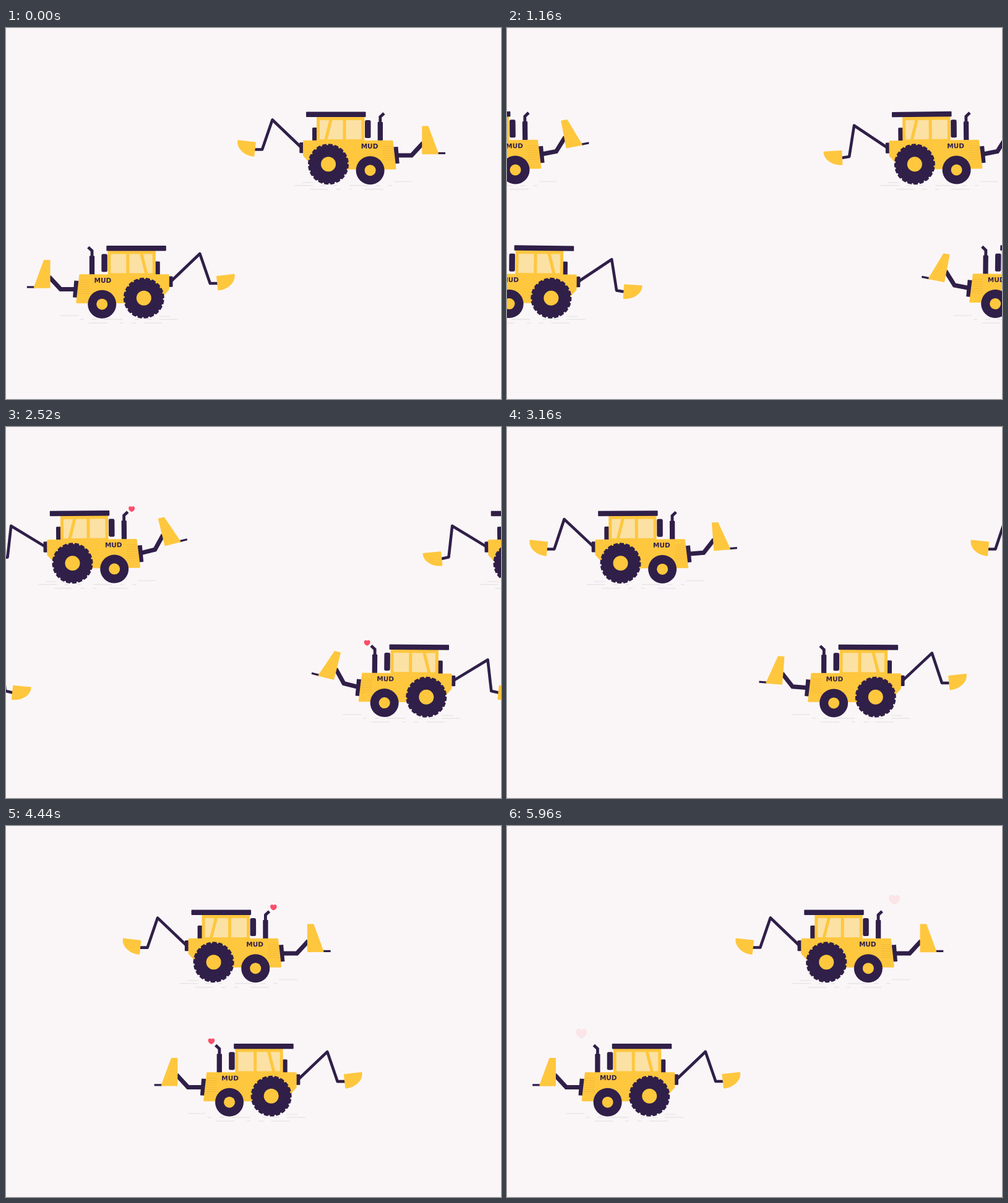
Animation, 800 px wide and 600 px high, one loop 6 s. Source, as an HTML page with a canvas:

```html
<!DOCTYPE html>
<html lang="en">
<head>
<meta charset="utf-8">
<title>Diggers in love</title>
<style>
html, body { margin: 0; width: 100%; height: 100%; overflow: hidden; background: #faf6f8; }
canvas { display: block; width: 800px; height: 600px; }
</style>
</head>
<body>
<canvas id="stage" width="800" height="600"></canvas>
<script>
const ctx = document.getElementById('stage').getContext('2d');
const LOOP = 6000, STEP = 40, RAD = Math.PI / 180;
const BG = '#faf6f8', YELLOW = '#ffc73e', DARK = '#301f48', GLASS = '#fbe1a4',
      GRILL = '#f1b73a', DUST = '#e8e5e8', PINK = '#fa4f68';

// Eased 0..1 ramp between two times
function ramp(t, a, b) {
  const x = Math.min(1, Math.max(0, (t - a) / (b - a)));
  return (1 - Math.cos(Math.PI * x)) / 2;
}

function line(color, width, ...points) {
  ctx.strokeStyle = color;
  ctx.lineWidth = width;
  ctx.beginPath();
  points.forEach(([x, y]) => ctx.lineTo(x, y));
  ctx.stroke();
}

// Fill and outline the current path, which rounds its corners
function soften(color, width) {
  ctx.closePath();
  ctx.fillStyle = ctx.strokeStyle = color;
  ctx.lineWidth = width;
  ctx.lineJoin = 'round';
  ctx.fill();
  ctx.stroke();
}

function poly(color, round, ...points) {
  ctx.beginPath();
  points.forEach(([x, y]) => ctx.lineTo(x, y));
  soften(color, round);
}

function box(color, x1, y1, x2, y2, r = 0) {
  ctx.fillStyle = color;
  ctx.beginPath();
  ctx.roundRect(x1, y1, x2 - x1, y2 - y1, r);
  ctx.fill();
}

function disc(color, x, y, r) {
  ctx.fillStyle = color;
  ctx.beginPath();
  ctx.arc(x, y, r, 0, 2 * Math.PI);
  ctx.fill();
}

// Draw inside a rotation about (x, y)
function turned(x, y, degrees, draw) {
  ctx.save();
  ctx.translate(x, y);
  ctx.rotate(degrees * RAD);
  ctx.translate(-x, -y);
  draw();
  ctx.restore();
}

function ground() {
  line(DUST, 1.5, [627, 248.5], [656, 248.5]);
  line(DUST, 1.5, [478, 250], [496, 250]);
  ctx.setLineDash([30, 12, 8, 13, 6, 20]);
  line(DUST, 1.5, [466, 254.7], [643, 254.7]);
  line(DUST, 1.5, [491, 260.7], [619, 260.7]);
  ctx.setLineDash([]);
}

function rearArm() {
  ctx.lineJoin = 'round';
  line(DARK, 4.6, [478, 194], [430.5, 148.5], [414, 196.5], [400, 196.5]);
  ctx.beginPath();
  ctx.moveTo(402.8, 185.5);
  ctx.ellipse(402.8, 185.5, 27.8, 21.6, 6.5 * RAD, Math.PI / 2, Math.PI);
  soften(YELLOW, 2);
}

function frontArm() {
  ctx.lineJoin = 'miter';
  line(DARK, 7, [628, 206], [655.5, 206], [674, 186]);
  line(DARK, 3.2, [697, 202.5], [710, 202.5]);
  poly(YELLOW, 2, [673.3, 159.5], [682, 159.5], [698, 203.2], [673.3, 203.2]);
}

function cab() {
  box(DARK, 495, 161, 503, 184, 1.5);
  box(DARK, 580, 149, 589.5, 178, 2.5);
  box(YELLOW, 502, 143, 579.3, 184);
  box(GLASS, 507, 149, 574.5, 180);
  line(YELLOW, 5, [547, 148], [547, 181]);
  line(YELLOW, 5, [525.2, 148], [516.8, 181]);
  box(DARK, 485, 135.5, 581.5, 144, 1);
  box(DARK, 600.7, 152, 609, 183, 1);
  ctx.lineJoin = 'miter';
  line(DARK, 4.8, [604.8, 154], [604.8, 143.8], [611, 138]);
}

function hull(flip) {
  box(DARK, 474.3, 185, 481, 202.3, 1.2);
  line(DARK, 7.5, [629.8, 192.3], [632, 219.3]);
  poly(YELLOW, 3, [481.5, 183.3], [624, 183.3], [629, 227.2], [501, 227.2], [481.5, 206]);
  for (let i = 0; i < 7; i++) {
    const y = 191.5 + i * 3.6;
    line(GRILL, 0.9, [609, y], [625 + i * 0.4, y]);
  }
  // Keep the label readable on the mirrored machine
  ctx.save();
  ctx.translate(587.5, 195);
  if (flip) ctx.scale(-1, 1);
  ctx.fillStyle = DARK;
  ctx.font = 'bold 10.5px "DejaVu Sans", Verdana, sans-serif';
  ctx.textAlign = 'center';
  ctx.fillText('MUD', 0, 0);
  ctx.restore();
}

function wheels(spin) {
  const teeth = 20, pitch = 2 * Math.PI / teeth;
  ctx.fillStyle = DARK;
  ctx.beginPath();
  for (let i = 0; i < teeth; i++) {
    const a = spin + i * pitch;
    ctx.arc(521, 220.3, 33, a, a + pitch * 0.68);
    ctx.arc(521, 220.3, 31, a + pitch * 0.72, a + pitch * 0.96);
  }
  ctx.fill();
  disc(YELLOW, 521, 220.3, 12);
  disc(DARK, 588.6, 230.2, 23);
  disc(YELLOW, 588.6, 230.2, 9);
}

// Heart puffed from the exhaust
function heart(age) {
  if (age <= 0 || age >= 560) return;
  const p = 1 - Math.pow(1 - age / 560, 1.7);
  const size = (0.38 + 0.62 * p) * Math.min(1, age / 50);
  ctx.save();
  ctx.globalAlpha = Math.min(1, (560 - age) / 205);
  ctx.translate(611 + 20 * p, 138 - 19 * p);
  ctx.scale(size, size);
  ctx.fillStyle = PINK;
  ctx.beginPath();
  ctx.moveTo(0, -5.8);
  ctx.bezierCurveTo(3, -9.6, 9, -8, 9, -2.2);
  ctx.bezierCurveTo(9, 3, 4, 6.8, 0, 8.2);
  ctx.bezierCurveTo(-4, 6.8, -9, 3, -9, -2.2);
  ctx.bezierCurveTo(-9, -8, -3, -9.6, 0, -5.8);
  ctx.fill();
  ctx.restore();
}

function digger(t, flip) {
  const c = t % 1500;
  const front = ramp(c, 0, 420) - ramp(c, 1020, 1450);
  const rear = ramp(c, 110, 560) - ramp(c, 1030, 1455);
  const tilt = Math.sin(Math.PI * c / 750) ** 2;
  ground();
  turned(521, 220.3, -0.62 * tilt, () => {
    turned(477, 193, -12 * rear, rearArm);
    turned(627, 207, -13.4 * front, frontArm);
    cab();
    hull(flip);
    wheels(t / LOOP * 7 * Math.PI);
  });
  for (let i = 0; i < 3; i++) heart(t % 3000 - 220 - 1100 * i);
}

function place(x, y, dir, t) {
  ctx.save();
  ctx.translate(x, y);
  ctx.scale(dir, 1);
  digger(t, dir < 0);
  ctx.restore();
}

function render(t) {
  const u = t / LOOP;
  ctx.fillStyle = BG;
  ctx.fillRect(0, 0, 800, 600);
  for (const k of [0, 1]) {
    place(713 * (u - k), 0, 1, t);
    place(743.8 - 783.3 * u + 785.5 * k, 216.5, -1, t);
  }
}

const start = performance.now();
function tick() {
  const t = (performance.now() - start) % LOOP;
  render(Math.floor(t / STEP) * STEP);
  requestAnimationFrame(tick);
}
tick();
</script>
</body>
</html>
```
